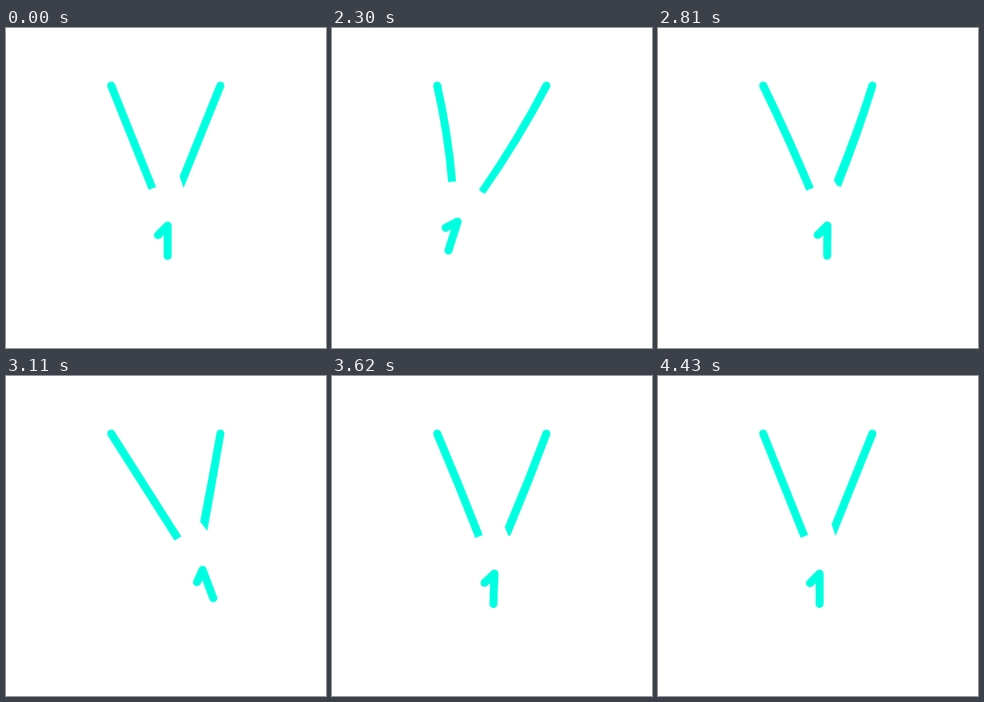
These frames come from a looping animation (400 px wide and 400 px high, 5120 ms). An HTML page:

```html
<!DOCTYPE html>
<html lang="en">
<head>
<meta charset="utf-8">
<title>Swinging medal</title>
<style>
  html, body { margin: 0; width: 100%; height: 100%; overflow: hidden; background: #fff; }
  svg { display: block; width: 100vw; height: 100vh; }
</style>
</head>
<body>
<svg viewBox="0 0 400 400" fill="#00ffe1">
  <circle cx="131.5" cy="72" r="5"/>
  <circle cx="268" cy="72" r="5"/>
  <path id="left" fill="none" stroke="#00ffe1" stroke-width="10"/>
  <path id="right"/>
  <path id="digit" d="M-12 12L0 0V38" fill="none" stroke="#00ffe1" stroke-width="10"
        stroke-linecap="round" stroke-linejoin="round"/>
</svg>
<script>
const LOOP = 5120, START = 2000, STEP = 30;
const LAG = 30;      // the digit's tilt trails its position
const TILT = -0.42;  // degrees per pixel of swing

// Turning points of the dying swing: time, sideways shift
const TURNS = [[START, 0], [2540, -56], [3020, 54], [3410, -28], [3800, 24], [4140, -8], [4430, 0]];

const $ = id => document.getElementById(id);
const left = $('left'), right = $('right'), digit = $('digit');

const mix = (a, b, k) => a + (b - a) * k;
const easeOut = u => 1 - (1 - u) ** 2;
const easeInOut = u => (1 - Math.cos(Math.PI * u)) / 2;
const bendOf = x => Math.max(0, -x) * 0.064;

// Straps bow only at the left turns and straighten towards the right ones
function swing(t) {
  const i = TURNS.findIndex(turn => turn[0] > t);
  if (i < 1) return { x: 0, bend: 0 };
  const [t0, x0] = TURNS[i - 1], [t1, x1] = TURNS[i];
  const u = (t - t0) / (t1 - t0);
  const k = i === 1 ? easeOut(u) : easeInOut(u);
  return { x: mix(x0, x1, k), bend: mix(bendOf(x0), bendOf(x1), k) };
}

const curve = (x1, y1, x2, y2, bow) =>
  `Q${(x1 + x2) / 2 + 2 * bow} ${(y1 + y2) / 2} ${x2} ${y2}`;

function leftStrap(x, bend) {
  const ex = 183 + 0.73 * x, ey = 200.5 + 0.12 * x - 0.0014 * x * x;
  return 'M131.5 72' + curve(131.5, 72, ex, ey, 0.75 * bend);
}

// The lower end is cut at a slant: inner corner, tip, outer corner
function rightStrap(x, bend) {
  const ax = 217 + 0.6 * x - 2.2 * bend, ay = 185.5 - 0.1 * x + 4.2 * bend;
  const bx = 222 + 0.68 * x, by = 200 - 0.157 * x;
  const tip = Math.min(3 * bend, 4);
  return 'M263.4 70' + curve(263.4, 70, ax, ay, bend) +
    `L${bx - tip} ${by - bend / 2}L${bx} ${by}` +
    curve(bx, by, 272.6, 74, bend) + 'Z';
}

function draw(ms) {
  const t = Math.floor((ms % LOOP - START) / STEP) * STEP + START;
  const { x, bend } = swing(t);
  const tilt = t < TURNS[TURNS.length - 1][0] ? TILT * swing(t - LAG).x : 0;
  left.setAttribute('d', leftStrap(x, bend));
  right.setAttribute('d', rightStrap(x, bend));
  digit.setAttribute('transform',
    `translate(${202 + x} ${247 - x * x / 400}) rotate(${tilt})`);
}

const begin = performance.now();
function tick() {
  draw(performance.now() - begin);
  requestAnimationFrame(tick);
}
tick();
</script>
</body>
</html>
```
